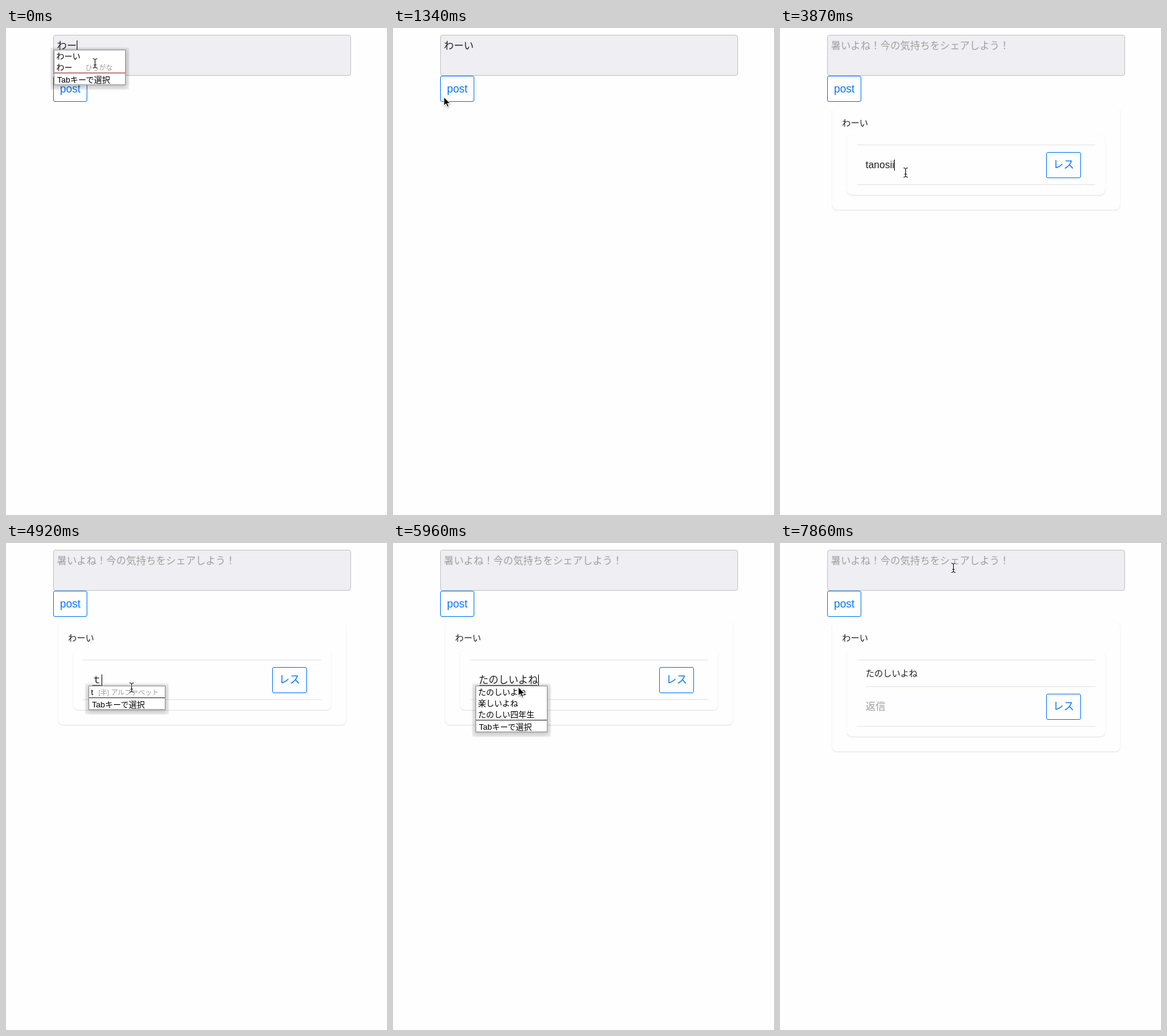
An HTML page for the animation above (8 s loop, 614x785 px).

```html
<!DOCTYPE html>
<html lang="ja">
<head>
<meta charset="utf-8">
<title>post</title>
<style>
html, body { margin: 0; width: 100%; height: 100%; overflow: hidden; background: #fefefe; }
body { position: relative; font: 16px "Liberation Sans", "Noto Sans CJK JP", "Noto Sans CJK", sans-serif; color: #1f1f21; }
div, svg { position: absolute; box-sizing: border-box; }
.text { height: 20px; line-height: 20px; white-space: pre; }
.small { font-size: 14px; }
.hint { color: #a0a0a0; }
#area { left: 76px; top: 11px; width: 480px; height: 66px; background: #eeeef3; border: 1px solid #c2c2c4; border-radius: 4px; }
.btn { height: 42px; line-height: 40px; border: 1px solid #0076ff; border-radius: 3px; color: #0076ff; font-size: 17px; text-align: center; white-space: pre; }
.card { background: #fefefe; border-radius: 8px; box-shadow: 0 1px 2px rgba(0,0,0,.13); }
.line { height: 1px; background: #e2e2e3; }
#thread { left: 0; top: 0; --d: 0px; }
#thread.sent { --d: 43px; }
#sent { display: none; }
.sent #sent { display: block; }
#outer { left: 84px; top: 127px; width: 464px; height: calc(166px + var(--d)); }
#inner { left: 108px; top: 172px; width: 416px; height: calc(97px + var(--d)); }
#row { left: 0; top: var(--d); }
.mark { width: 1px; background: #000; }
.under { height: 1px; background: #555; }
#popup { background: #fff; border: 1px solid #8c8c8c; box-shadow: 0 2px 7px 1px rgba(0,0,0,.2), 0 2px 1px 5px rgba(0,0,0,.07); color: #000; font-size: 13px; }
#popup .note { color: #999; font-size: 11px; }
#popup .rule { left: 0; right: 0; height: 1px; }
#arrow, #beam { overflow: visible; width: 1px; height: 1px; left: 0; top: 0; }
</style>
</head>
<body>
<div id="area"></div>
<div class="btn" style="left:76px;top:77px;width:55px;font-size:17.5px">post</div>
<div id="thread">
  <div class="card" id="outer"></div>
  <div class="card" id="inner"></div>
  <div class="text small" style="left:100px;top:143px">わーい</div>
  <div class="line" style="left:124px;top:188px;width:384px"></div>
  <div id="sent">
    <div class="text small" style="left:138px;top:200px">たのしいよね</div>
    <div class="line" style="left:138px;top:231px;width:370px"></div>
  </div>
  <div id="row">
    <div class="btn" style="left:429px;top:200px;width:56px">レス</div>
    <div class="line" style="left:124px;top:252px;width:384px"></div>
    <div class="text" id="reply" style="left:138px;top:211px"></div>
  </div>
</div>
<div class="text" id="post" style="left:82px;top:19px"></div>
<div class="under" id="under"></div>
<div class="mark" id="caret"></div>
<div id="popup"></div>
<svg id="arrow"><path d="M0 0V14.5L3.4 11.4 5.8 16.6 8.3 15.5 6 10.5H10.6Z" fill="#000" stroke="#fff" stroke-width="1.1" style="filter:drop-shadow(0 1px 1px rgba(0,0,0,.35))"/></svg>
<svg id="beam"><g fill="none"><path id="ib" d="M-3.5 -7.5Q0 -7.5 0 -5V5Q0 7.5 -3.5 7.5M3.5 -7.5Q0 -7.5 0 -5V5Q0 7.5 3.5 7.5M-2 2.5H2" stroke="#fff" stroke-opacity=".75" stroke-width="2.4"/><use href="#ib"/><path d="M-3.5 -7.5Q0 -7.5 0 -5V5Q0 7.5 -3.5 7.5M3.5 -7.5Q0 -7.5 0 -5V5Q0 7.5 3.5 7.5M-2 2.5H2" stroke="#111" stroke-width="1.1"/></g></svg>
<script>
const LOOP = 8000;
const $ = id => document.getElementById(id);

// time, pointer shape, x, y
const pointer = [
  [0, 'beam', 143.5, 57], [900, 'beam', 134, 67], [1040, 'arrow', 110, 93],
  [1190, 'arrow', 89, 107], [1340, 'arrow', 82, 111], [1480, 'arrow', 82, 110.5],
  [1930, 'arrow', 106, 136], [2070, 'arrow', 156, 182], [2220, 'beam', 191, 220],
  [2370, 'beam', 202.5, 233], [5070, 'arrow', 202, 232],
  [6550, 'beam', 226, 236], [6700, 'beam', 290, 238], [6840, 'beam', 366, 235],
  [6990, 'arrow', 430, 224], [7130, 'arrow', 452, 216], [7280, 'arrow', 452, 217],
  [7570, 'arrow', 408, 190], [7720, 'arrow', 340, 106], [7860, 'beam', 279.5, 40]
];

// time, typed text, caret, candidates as [word, note], popup width
const post = [
  [0, 'わー', 1, [['わーい'], ['わー', 'ひらがな']], 116],
  [300, 'わーい', 1, [['わーい'], ['わーい', 'ひらがな']], 140],
  [450, 'わーい', 1], [900, 'わーい', 0], [1630, '', 0]
];
const reply = [
  [0, '', 0], [2670, '', 1],
  [3120, 't', 1], [3270, 'tan', 1], [3420, 'tano', 1], [3570, 'tanos', 1],
  [3720, 'tanosi', 1], [3870, 'tanosii', 1], [4020, 'tanosi', 1],
  [4320, 'tan', 1], [4470, '', 1],
  [4920, 'ｔ', 1, [['t', '[半] アルファベット']], 124],
  [5070, 'た', 1, [['た'], ['他'], ['た', 'ひらがな']], 116],
  [5210, 'たｎ', 1, [['たn', '[半] アルファベット']], 144],
  [5360, 'たの', 1, [['たの'], ['他の'], ['楽しい']], 116],
  [5510, 'たのし', 1, [['たのし'], ['楽しい'], ['楽しみ']], 116],
  [5660, 'たのしい', 1, [['たのしい'], ['楽しい'], ['愉しい']], 116],
  [5810, 'たのしいよ', 1, [['たのしいよ'], ['楽しいよ'], ['たのしい余']], 116],
  [5960, 'たのしいよね', 1, [['たのしいよね'], ['楽しいよね'], ['たのしい四年生']], 116],
  [6100, 'たのしいよね', 1], [7420, '', 0]
];

const at = (list, t) => list.findLast(s => s[0] <= t);

function place(el, x, y, w, h) {
  Object.assign(el.style, { left: x + 'px', top: y + 'px', width: w + 'px', height: h + 'px' });
}

function setField(el, text, hint) {
  el.textContent = text || hint;
  el.classList.toggle('hint', !text);
}

function row(parent, x, mid, text, note) {
  const el = document.createElement('div');
  el.className = 'text';
  el.style.cssText = `left:${x}px;top:${mid - 10}px`;
  el.textContent = text;
  if (note) {
    const span = document.createElement('span');
    span.className = 'note';
    span.style.marginLeft = '7px';
    span.textContent = note;
    el.append(span);
  }
  parent.append(el);
  return el;
}

function drawPopup(words, x, y, w, ruleColor) {
  const box = $('popup');
  box.replaceChildren();
  box.style.display = words ? '' : 'none';
  if (!words) return;
  const n = words.length * 18;
  place(box, x, y, w, n + 21);
  const rows = words.map(([word], i) => row(box, 3, 10 + i * 18, word));
  // notes share one column right of the widest word
  const col = 3 + Math.max(...rows.map(r => r.offsetWidth)) + 8;
  words.forEach(([, note], i) => {
    if (note) row(box, col, 10 + i * 18, '', note).firstElementChild.style.margin = 0;
  });
  const rule = document.createElement('div');
  rule.className = 'rule';
  rule.style.cssText = `top:${n}px;background:${ruleColor}`;
  box.append(rule);
  row(box, 4.5, n + 12, 'Tabキーで選択');
}

function drawInput(p, r, posted) {
  setField($('post'), p[1], '暑いよね！今の気持ちをシェアしよう！');
  setField($('reply'), r[1], '返信');
  const s = posted ? r : p;
  const x = posted ? 138 : 82, y = posted ? 212 : 20;
  const w = s[1] ? $(posted ? 'reply' : 'post').offsetWidth : 0;
  $('caret').style.display = s[2] ? '' : 'none';
  place($('caret'), x + w, y, 1, posted ? 18 : 16);
  $('under').style.display = s[3] ? '' : 'none';
  place($('under'), x + 1, y + (posted ? 17 : 15), Math.max(w - 2, 0), 1);
  drawPopup(s[3], x - 5, posted ? 230 : 35, s[4], posted ? '#222' : '#8a1c1c');
}

let lastPost, lastReply;
function draw(t) {
  const posted = t >= 1630;
  $('thread').style.display = posted ? '' : 'none';
  $('thread').classList.toggle('sent', t >= 7420);
  const p = at(post, t), r = at(reply, t);
  if (p !== lastPost || r !== lastReply) drawInput(p, r, posted);
  lastPost = p;
  lastReply = r;
  const [, shape, x, y] = at(pointer, t);
  for (const id of ['arrow', 'beam']) {
    $(id).style.display = id === shape ? '' : 'none';
    $(id).style.transform = `translate(${x}px, ${y}px)`;
  }
}

const start = performance.now();
function tick() {
  draw((performance.now() - start) % LOOP);
  requestAnimationFrame(tick);
}
tick();
</script>
</body>
</html>
```
